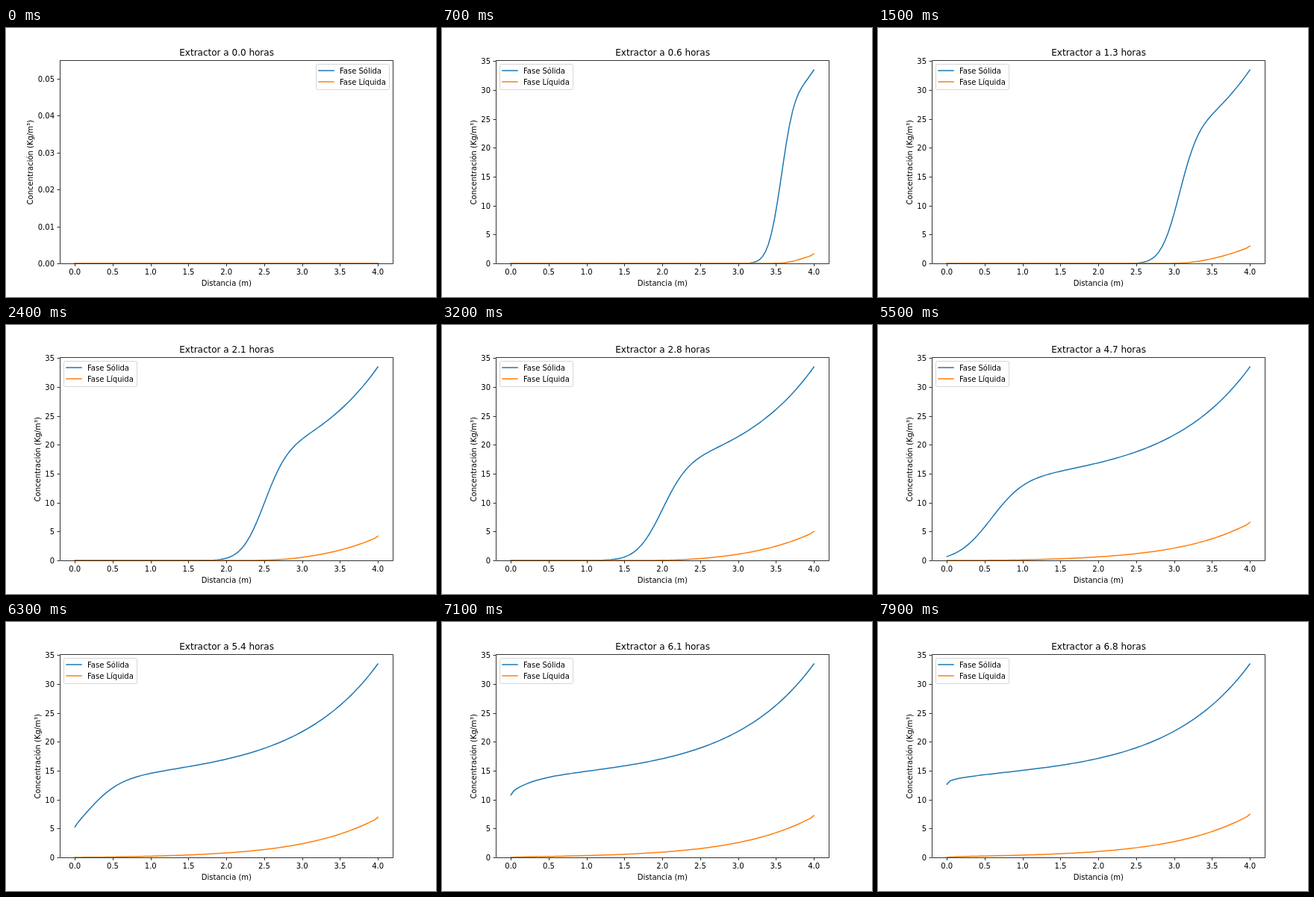
These frames come from a looping animation (576 px wide and 360 px high, 8000 ms). An HTML page:

```html
<!DOCTYPE html>
<html lang="es">
<head>
<meta charset="utf-8">
<title>Extractor</title>
<style>
  html, body { margin: 0; width: 100%; height: 100%; overflow: hidden; background: #fff; }
  svg { display: block; width: 576px; height: 360px; }
  text { font: 10px "DejaVu Sans", Verdana, sans-serif; fill: #000; }
  .title { font-size: 12px; }
  .mid { text-anchor: middle; }
  .end { text-anchor: end; }
  .axis { fill: none; stroke: #000; stroke-width: .8; stroke-linecap: butt; }
  .curve { fill: none; stroke-width: 1.5; stroke-linecap: square; stroke-linejoin: round; }
  .solid { stroke: #1f77b4; }
  .liquid { stroke: #ff7f0e; }
  .box { fill: #fff; fill-opacity: .8; stroke: #ccc; stroke-opacity: .8; }
</style>
</head>
<body>
<svg viewBox="0 0 576 360">
  <clipPath id="area"><rect x="72" y="43" width="446.4" height="272.4"/></clipPath>
  <g clip-path="url(#area)">
    <path id="solid" class="curve solid"/>
    <path id="liquid" class="curve liquid"/>
  </g>
  <path class="axis" d="M72.5 43.5H518.5V315.5H72.5Z"/>
  <g id="xTicks"></g>
  <g id="yTicks"></g>
  <text id="title" class="title mid" x="295.6" y="37"></text>
  <text class="mid" x="295.4" y="345">Distancia (m)</text>
  <text id="yLabel" class="mid">Concentración (Kg/m³)</text>
  <g id="legend">
    <rect class="box" x="77.5" y="48.5" width="98" height="34" rx="2"/>
    <path class="curve solid" d="M81 57H101"/>
    <path class="curve liquid" d="M81 72H101"/>
    <text x="109" y="60.6">Fase Sólida</text>
    <text x="109" y="76">Fase Líquida</text>
  </g>
</svg>
<script>
const FRAMES = 80, FRAME_MS = 100, HOURS = 310 / 3600;
const CELLS = 100, LENGTH = 4, DX = LENGTH / CELLS, SUBSTEPS = 60;
const FEED = 33.45;           // solid entering at the right end
const V_SOLID = .695, V_LIQUID = .68;   // m/h, opposite directions
const RATE = .72, RATIO = .405;

const $ = id => document.getElementById(id);
const px = x => 92.29 + x * 405.82 / LENGTH;
const py = (y, top) => 315 - y * 271.8 / top;

// Solid concentration in balance with the liquid
const balance = c => 14.4 * c / (c + .02) + .22 * c;

// Countercurrent extraction, upwind differences
function simulate() {
  const s = new Float64Array(CELLS + 1), c = new Float64Array(CELLS + 1);
  const dt = HOURS / SUBSTEPS, flux = new Float64Array(CELLS + 1);
  const states = [{ s: s.slice(), c: c.slice() }];
  s[CELLS] = FEED;
  for (let f = 1; f < FRAMES; f++) {
    for (let n = 0; n < SUBSTEPS; n++) {
      // the outlet cell is only half held back
      for (let i = 0; i <= CELLS; i++)
        flux[i] = RATE * (s[i] - balance(c[i]) * (i < CELLS ? 1 : .5));
      for (let i = 0; i < CELLS; i++)
        s[i] += dt * (V_SOLID * (s[i + 1] - s[i]) / DX - flux[i]);
      for (let i = CELLS; i > 0; i--)
        c[i] += dt * (RATIO * flux[i] - V_LIQUID * (c[i] - c[i - 1]) / DX);
    }
    states.push({ s: s.slice(), c: c.slice() });
  }
  return states;
}

function curve(values, top) {
  return 'M' + Array.from(values, (v, i) =>
    px(i * DX).toFixed(2) + ' ' + py(v, top).toFixed(2)).join('L');
}

function xTicks() {
  let out = '';
  for (let x = 0; x <= LENGTH; x += .5) {
    const p = Math.round(px(x)) + .5;
    out += `<path class="axis" d="M${p} 315.5v3.5"/>` +
      `<text class="mid" x="${px(x)}" y="330">${x.toFixed(1)}</text>`;
  }
  return out;
}

function yTicks(step, top, digits) {
  let out = '';
  for (let k = 0; k * step <= top; k++) {
    const p = Math.round(py(k * step, top));
    out += `<path class="axis" d="M72 ${p + .5}h-3.5"/>` +
      `<text class="end" x="65" y="${p + 4}">${(k * step).toFixed(digits)}</text>`;
  }
  return out;
}

// The empty chart has its own scale and legend corner
function layout(empty, top) {
  $('yTicks').innerHTML = empty ? yTicks(.01, top, 2) : yTicks(5, top, 0);
  $('yLabel').setAttribute('transform', `translate(${empty ? 36 : 45.5} 179.8) rotate(-90)`);
  $('legend').setAttribute('transform', `translate(${empty ? 338 : 0} 0)`);
}

const states = simulate();
let shown = -1;

function draw() {
  const f = Math.floor(performance.now() / FRAME_MS) % FRAMES;
  if (f !== shown) {
    const empty = f === 0, top = empty ? .055 : FEED * 1.05;
    if (shown < 0 || empty !== (shown === 0)) layout(empty, top);
    $('title').textContent = `Extractor a ${(f * HOURS).toFixed(1)} horas`;
    $('solid').setAttribute('d', curve(states[f].s, top));
    $('liquid').setAttribute('d', curve(states[f].c, top));
    shown = f;
  }
  requestAnimationFrame(draw);
}

$('xTicks').innerHTML = xTicks();
draw();
</script>
</body>
</html>
```
